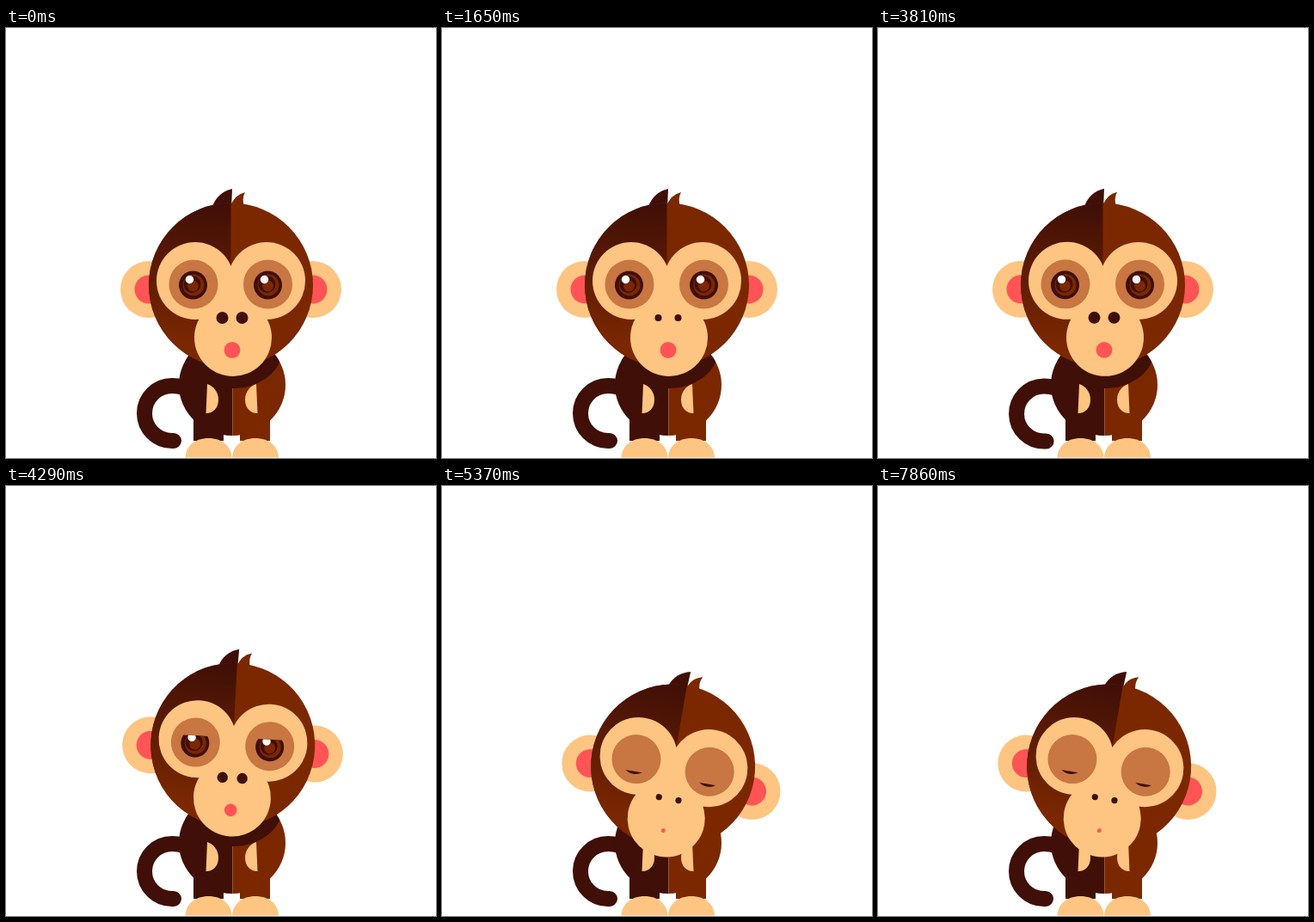
These frames come from a looping animation (500 px wide and 500 px high, 9 s). An HTML page:

```html
<!DOCTYPE html>
<html lang="en">
<head>
<meta charset="utf-8">
<title>Sleepy monkey</title>
<style>
  html, body { margin: 0; width: 100%; height: 100%; overflow: hidden; background: #fff; }
  svg { display: block; width: 100vw; height: 100vh; }
  .dark { fill: #400f07; }
  .brown { fill: #7b2800; }
  .skin { fill: #fdc581; }
  .socket { fill: #c87642; }
  .pink { fill: #ff5456; }
</style>
</head>
<body>
<svg viewBox="0 0 500 500">
  <defs>
    <linearGradient id="shade" gradientUnits="userSpaceOnUse" x1="225" y1="205" x2="215" y2="370">
      <stop stop-color="#400f07"/>
      <stop offset="1" stop-color="#7b2800"/>
    </linearGradient>
    <clipPath id="torso"><ellipse cx="263" cy="415" rx="62" ry="59"/></clipPath>
    <clipPath id="open"><rect id="lid" x="180" width="170" height="60"/></clipPath>
    <g id="eye">
      <circle class="dark" r="16.5"/>
      <circle class="brown" cx=".5" r="12.5"/>
      <circle class="dark" cx="-1" cy="-1" r="10"/>
      <circle class="brown" cy="1" r="6.5"/>
      <circle cx="-4" cy="-6.500" r="4.700" fill="#fff"/>
    </g>
    <g id="ear">
      <circle class="skin" r="33"/>
      <circle class="pink" r="16.5"/>
    </g>
    <path id="hand" class="skin" d="M234 414C241 416 247 423 247 432C247 442 241 448 232.500 448Z"/>
    <path id="foot" class="skin" d="M208.500 499.500C209 486 220 477 235.500 477S262 486 262.500 499.500Z"/>
  </defs>

  <path id="tail" d="M222 424Q206 416 193 416A32 32 0 0 0 193 480H195"
        fill="none" stroke="#400f07" stroke-width="18" stroke-linecap="round"/>
  <path class="dark" d="M218 445H253V480H218Z"/>
  <path class="brown" d="M272 445H307V480H272Z"/>
  <g id="body">
    <g clip-path="url(#torso)">
      <path class="dark" d="M190 350H263.500V480H190Z"/>
      <path class="brown" d="M263.500 350H340V480H263.500Z"/>
      <ellipse class="dark" cx="264" cy="372" rx="58" ry="47"/>
    </g>
  </g>
  <use href="#hand"/>
  <use href="#hand" transform="matrix(-1 0 0 1 525 0)"/>
  <use href="#foot"/>
  <use href="#foot" x="54.500"/>

  <g id="head">
    <g id="ears">
      <use href="#ear" x="166" y="304"/>
      <use href="#ear" x="357" y="304"/>
    </g>
    <path class="brown" d="M261 208Q265 194 278 191Q274 198 277 208Z"/>
    <path class="dark" d="M240 207.500Q246 191 263 187L262 210Z"/>
    <circle class="brown" cx="261.500" cy="299" r="95.500"/>
    <path fill="url(#shade)" d="M261.500 203.500A95.500 95.500 0 0 0 261.500 394.500Z"/>
    <g class="skin">
      <circle cx="220" cy="294" r="45"/>
      <circle cx="303" cy="294" r="45"/>
      <circle cx="264" cy="360" r="45"/>
      <path d="M252 300H272V325H252Z"/>
    </g>
    <circle class="socket" cx="218" cy="298" r="28.500"/>
    <circle class="socket" cx="304.500" cy="298" r="28.500"/>
    <g clip-path="url(#open)">
      <use href="#eye" x="217.500" y="299"/>
      <use href="#eye" x="304.500" y="299"/>
    </g>
    <circle class="dark nostril" cx="251.500" cy="337"/>
    <circle class="dark nostril" cx="274.500" cy="337"/>
    <circle id="mouth" class="pink" cx="263" cy="374.500"/>
  </g>
</svg>
<script>
const LOOP = 9000;
const byId = id => document.getElementById(id);
const nostrils = document.querySelectorAll('.nostril');
const move = (id, transform) => byId(id).setAttribute('transform', transform);

function draw(t) {
  const progress = (from, to) => Math.min(1, Math.max(0, (t - from) / (to - from)));
  const ease = (from, to) => (1 - Math.cos(Math.PI * progress(from, to))) / 2;
  const hump = (from, to) => Math.sin(Math.PI * progress(from, to)) ** 2;

  // Awake: wiggle the ears, sniff, flick the tail, blink.
  const wiggle = Math.sin(3 * Math.PI * progress(510, 2220));
  const sniff = hump(1020, 2280);
  const blink = hump(2640, 2910);
  const flick = hump(510, 750) + blink + hump(3780, 4020);

  // Nodding off, then one deep breath while asleep.
  const nod = ease(3780, 5130);
  const sink = ease(4020, 5190);
  const eyesShut = ease(3780, 5250);
  const breath = ease(6510, 7110) - ease(7110, 7860);

  const lift = 5 * hump(3780, 4380) + 3.7 * breath;
  move('head', `translate(${7.3 * nod} ${27 * sink - lift}) rotate(${9.8 * nod} 261.5 298)`);
  move('ears', `translate(0 ${8 * (ease(4680, 5370) - breath) - 22 * wiggle})`);
  move('tail', `rotate(${-6 * flick} 228 445)`);
  move('body', `translate(263 430) scale(${1 + 0.04 * breath}) translate(-263 -430)`);
  byId('lid').setAttribute('y', 282 + 30.3 * (eyesShut + blink));
  byId('mouth').setAttribute('r', 9.5 - 7.1 * ease(3780, 5160) + 6.1 * breath);
  const nostril = 7 - 3 * sniff - 3.4 * (ease(3780, 5370) - breath);
  nostrils.forEach(n => n.setAttribute('r', nostril));
}

const start = performance.now();
function tick() {
  draw((performance.now() - start) % LOOP);
  requestAnimationFrame(tick);
}
tick();
</script>
</body>
</html>
```
